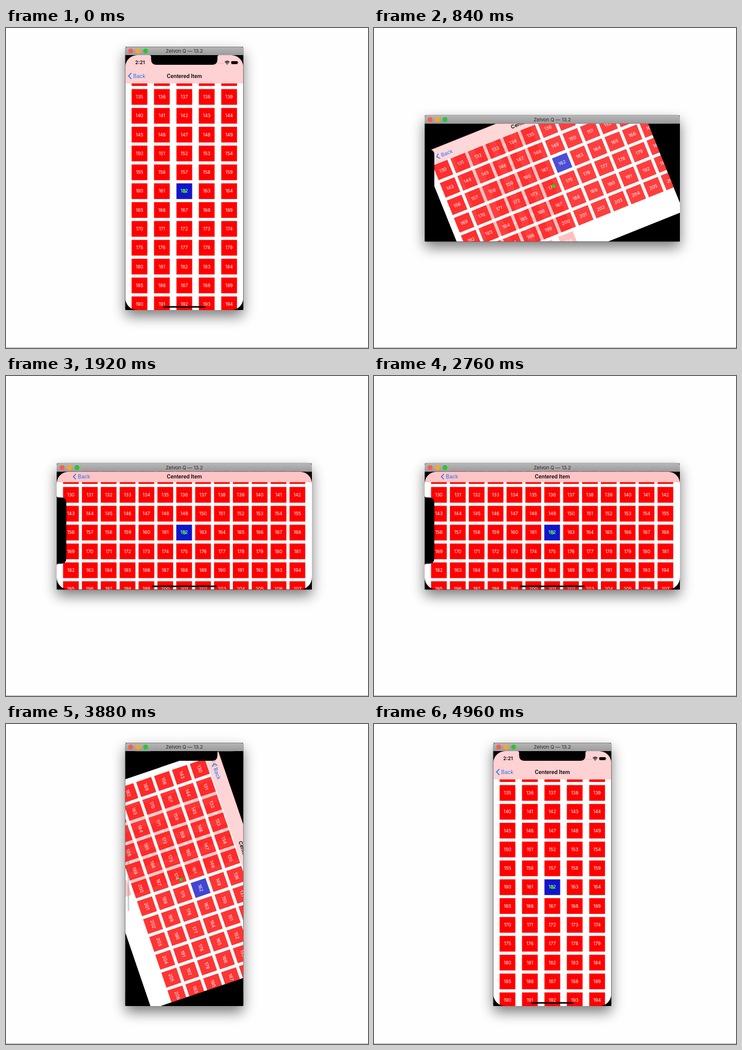
An HTML page that plays this animation: 600x531 px, repeating every 5 s.

```html
<!DOCTYPE html>
<html lang="en">
<head>
<meta charset="utf-8">
<title>Centered Item</title>
<style>
  html, body { margin: 0; width: 100%; height: 100%; overflow: hidden; background: #fefefe; }
  svg { display: block; width: 600px; height: 531px; font-family: Inter, Roboto, sans-serif; }
  .mid { text-anchor: middle; }
  .cell { font-size: 7.6px; fill: #fff; }
</style>
</head>
<body>
<svg id="stage" viewBox="0 0 600 531">
  <defs>
    <linearGradient id="bar" x1="0" y1="0" x2="0" y2="1">
      <stop offset="0" stop-color="#b6b6b6"/>
      <stop offset="1" stop-color="#9b9b9b"/>
    </linearGradient>
    <filter id="soft" x="-50%" y="-50%" width="200%" height="200%">
      <feGaussianBlur stdDeviation="11"/>
    </filter>
    <clipPath id="screenClip"><rect id="screenBox"/></clipPath>
    <clipPath id="viewClip"><rect id="viewBox"/></clipPath>
  </defs>
  <rect width="600" height="531" fill="#fefefe"/>
  <rect y="530" width="600" height="1" fill="#b4b4b4"/>

  <g transform="translate(295.5 256.5)">
    <rect id="shadow" rx="3" filter="url(#soft)" opacity=".52"/>
    <rect id="back" rx="2"/>
    <g id="title">
      <path id="titleBar" fill="url(#bar)"/>
      <g id="lights">
        <circle cx="9" cy="7" r="4" fill="#fb5b53"/>
        <circle cx="21.4" cy="7" r="4" fill="#f8a81f"/>
        <circle cx="33.6" cy="7" r="4" fill="#27c535"/>
      </g>
      <text class="mid" y="9.8" font-size="8" fill="#222">Zelvon Q — 13.2</text>
    </g>
    <g clip-path="url(#screenClip)">
      <g id="view">
        <g clip-path="url(#viewClip)">
          <rect id="page" fill="#fff"/>
          <g id="tall"></g>
          <g id="wide"></g>
          <rect id="nav"/>
          <g id="status" font-weight="600">
            <text class="mid" x="24.4" y="15.2" font-size="8">2:21</text>
            <g fill="#999">
              <circle cx="154.3" cy="13.8" r=".6"/><circle cx="156.7" cy="13.8" r=".6"/>
              <circle cx="159.1" cy="13.8" r=".6"/><circle cx="161.5" cy="13.8" r=".6"/>
            </g>
            <g fill="none" stroke="#000" stroke-width="1.2">
              <path d="M164.9 11.6q3.9-3.4 7.8 0M166.3 13.2q2.5-2 5 0"/>
            </g>
            <path d="M167.4 14.3q1.4-1 2.8 0l-1.4 1.5z"/>
            <rect x="175.6" y="9.9" width="10.4" height="5" rx="1.3"/>
            <rect x="186.5" y="11.4" width=".8" height="2" rx=".4"/>
          </g>
          <g id="backLink">
            <path id="chevron" d="M4.6-4.8L0 0L4.6 4.8" fill="none" stroke="#1673f5" stroke-width="1.5"/>
            <text x="7.7" y="3.1" font-size="8.6" fill="#1673f5">Back</text>
          </g>
          <text id="heading" class="mid" font-size="8.5" font-weight="600">Centered Item</text>
        </g>
        <circle id="dot" r="2.9" fill="#00e21a"/>
      </g>
      <g id="homeTurn"><rect id="home" height="2.6" rx="1.3"/></g>
      <path id="bezel" fill-rule="evenodd"
        d="M-99-213H99V213H-99ZM-77.75-211.5H-58q3 0 3 3v4q0 9 9 9H46q9 0 9-9v-4q0-3 3-3H77.75a20 20 0 0 1 20 20V191.5a20 20 0 0 1-20 20H-77.75a20 20 0 0 1-20-20V-191.5a20 20 0 0 1 20-20Z"/>
    </g>
  </g>
</svg>
<script>
const LOOP = 5000, STEP = 40, SHORT = 195.5, LONG = 423, TURN = 344, BAR = 14;
const CELL = 26.07, GAP = 31.28;
const toWide = { flip: 560, start: 609 };
const toTall = { flip: 3720, start: 3776 };

const el = id => document.getElementById(id);
const set = (id, attrs) => {
  for (const k in attrs) el(id).setAttribute(k, attrs[k]);
};
const box = (id, w, h, dy = 0) =>
  set(id, { x: -w / 2, y: -h / 2 + dy, width: w, height: h });
const clamp = x => Math.max(0, Math.min(1, x));
const mix = (a, b, k) => a + (b - a) * k;
const ease = x => (1 - Math.cos(Math.PI * clamp(x))) / 2;

// Cells of one layout, measured from the view's top left corner.
function fill(id, cols, first, rows, x0, y0, dx) {
  let out = '';
  for (let i = 0; i < cols * rows; i++) {
    const n = first + i;
    const x = x0 + dx * (i % cols), y = y0 + GAP * Math.floor(i / cols);
    out += `<rect x="${x - CELL / 2}" y="${y - CELL / 2}" width="${CELL}" height="${CELL}" fill="${n === 162 ? '#1414c8' : '#fe0000'}"/>` +
      `<text class="cell mid" x="${x}" y="${y + 2.7}">${n}</text>`;
  }
  el(id).innerHTML = out;
}
fill('tall', 5, 130, 13, 23.5, 38.1, 37.14);
fill('wide', 13, 117, 7, 23.6, 7.2, 31.28);

function drawWindow(wide) {
  const w = wide ? LONG : SHORT, h = wide ? SHORT : LONG;
  box('shadow', w, h + BAR, 3);
  box('back', w, h + BAR, -BAR / 2);
  box('screenBox', w, h);
  set('title', { transform: `translate(0 ${-h / 2 - BAR + .3})` });
  set('titleBar', { d: `M${-w / 2} ${BAR}V3q0-3 3-3H${w / 2 - 3}q3 0 3 3V${BAR}Z` });
  set('lights', { transform: `translate(${-w / 2} 0)` });
  set('bezel', { transform: `rotate(${wide ? -90 : 0})` });
}

// k: 0 is the tall layout, 1 the wide one.
function drawView(k, angle) {
  const w = mix(SHORT, LONG, k), h = mix(LONG, SHORT, k);
  const corner = `translate(${-w / 2} ${-h / 2})`;
  const navH = mix(47, 17.5, k), lineY = mix(34.6, 8.2, k) - h / 2;
  const pale = 80 * k * (1 - k);
  set('view', { transform: `rotate(${angle})` });
  box('viewBox', w, h);
  box('page', w, h);
  set('tall', { transform: corner, opacity: 1 - k });
  set('wide', { transform: corner, opacity: k });
  set('status', { transform: corner });
  set('nav', {
    x: -w / 2, y: -h / 2, width: w, height: navH,
    fill: `rgb(254,${mix(209, 197, k) + pale},${mix(211, 199, k) + pale})`
  });
  set('backLink', { transform: `translate(${mix(5.4, 27.6, k) - w / 2} ${lineY})` });
  set('chevron', { transform: `scale(${mix(1, .88, k)})` });
  set('heading', { y: lineY + 3.1 });
  set('dot', { cy: mix(14.4, 3.5, k) });
}

function drawHome(wide, angle, color, opacity) {
  const len = wide ? 108 : 70, y = wide ? 91.2 : 205;
  set('homeTurn', { transform: `rotate(${angle})` });
  set('home', { x: -len / 2, y, width: len, fill: color, opacity });
}

function draw(t) {
  const wide = t >= toWide.flip && t < toTall.flip;
  const back = t >= toTall.flip;
  const start = back ? toTall.start : toWide.start;
  const p = ease((t - start) / TURN);
  const angle = back ? 90 * (1 - p) : wide ? -90 * (1 - p) : 0;
  drawWindow(wide);
  drawView(back ? 1 - p : p, angle);
  set('status', { opacity: back ? p : wide ? 0 : 1 });

  const since = t - start;
  if (t < toWide.flip) drawHome(false, 0, '#000', 1);
  else if (since < TURN) {
    const fade = clamp(1 - since / 240);
    drawHome(back, back ? 90 : -90, since < 0 ? '#000' : '#777', since < 0 ? 1 : .65 * fade);
  } else drawHome(wide, 0, '#000', clamp((since - TURN - 20) / 190));
}

function tick(now) {
  draw(Math.floor((now % LOOP) / STEP) * STEP);
  requestAnimationFrame(tick);
}
draw(0);
requestAnimationFrame(tick);
</script>
</body>
</html>
```
